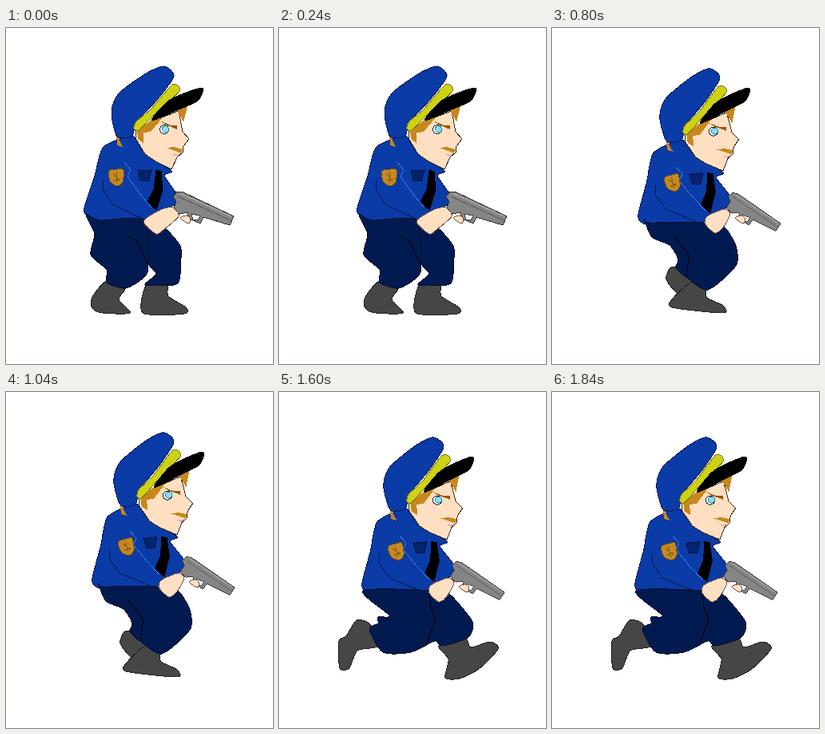
An HTML page that plays this animation: 334 px wide and 421 px high, repeating every 2000 ms.

```html
<!DOCTYPE html>
<html lang="en">
<head>
<meta charset="utf-8">
<title>Crouching officer</title>
<style>
html, body { margin: 0; width: 100%; height: 100%; overflow: hidden; background: #fff; }
svg { display: block; width: 100vw; height: 100vh; }
path, circle { shape-rendering: crispEdges; }
</style>
</head>
<body>
<svg id="stage" viewBox="0 0 334 421"></svg>
<script>
const BLUE = '#0a3ba6', EDGE = '#041a55', NAVY = '#031a51', BOOT = '#464646',
  SKIN = '#ffdfc2', HAIR = '#c8871c', GOLD = '#c68a22', STEEL = '#858585';

const poly = (fill, stroke, points) => `<path d="M${points}Z" fill="${fill}" stroke="${stroke}"/>`;
const line = (stroke, points) => `<path d="M${points}" fill="none" stroke="${stroke}"/>`;
const disc = (fill, stroke, x, y, r) => `<circle cx="${x}" cy="${y}" r="${r}" fill="${fill}" stroke="${stroke}"/>`;
const group = (transform, body) => `<g transform="${transform}">${body}</g>`;

// Closed soft outline through a few points
function blob(fill, stroke, points) {
  const v = points.split(' ').map(Number), n = v.length;
  const at = i => v[(i + n) % n];
  let d = `${v[0]} ${v[1]}`;
  for (let i = 0; i < n; i += 2) {
    const ease = (k, s) => at(k) + s * (at(k + 2) - at(k - 2)) / 8;
    d += `C${ease(i, 1)} ${ease(i + 1, 1)} ${ease(i + 2, -1)} ${ease(i + 3, -1)} ${at(i + 2)} ${at(i + 3)}`;
  }
  return poly(fill, stroke, d);
}
const cloth = points => blob(NAVY, '#020c2c', points);
const boot = points => blob(BOOT, '#222', points);

const cap =
  blob(BLUE, EDGE, '139 136 132 105 141 82 175 57 198 48 210 61 189 90 163 118 158 135') +
  blob('#ced114', '#77790d', '160 126 163 117 181 102 208 71 217 79 188 106 166 128') +
  blob('#000', '#000', '182 116 205 90 245 75 240 91 214 103');

const face =
  poly(HAIR, 'none', '138 133 146 149 139 147') +
  poly(SKIN, '#3a2a20', '163 127 182 117 216 104 221 130 229 139 222 148 221 156 214 162 207 177 187 167 174 158 162 138') +
  poly(HAIR, 'none', '164 127 186 113 196 112 181 130 172 131 172 144 165 139') +
  poly(HAIR, 'none', '214 103 227 98 222 118') +
  disc('#fff', '#222', 198, 127, 5.5) +
  disc('#8edcf0', '#2586a0', 199.5, 126.5, 4) +
  poly('#93560b', 'none', '193 116 206 122 214 122 214 127 200 121') +
  poly(HAIR, 'none', '201 150 210 149 221 152 219 157') +
  line('#e08a80', '209 158 213 160 217 158');

const torso =
  blob(BLUE, EDGE, '121 150 148 137 160 136 174 157 207 179 198 185 214 209 211 221 174 241 117 241 101 235 98 225 111 185') +
  poly('#000', '#000', '188 178 194 180 196 203 188 228 177 218 185 202') +
  poly('#04246f', '#021440', '165 179 182 178 178 192 168 191') +
  line(EDGE, '122 190 121 202 133 221 173 240') +
  line('#3976df', '148 168 156 178 152 186 166 206 182 225');

const badge =
  blob(GOLD, '#7a5210', '-9 -8 1 -10 9 -9 8 6 1 11 -8 5') +
  line('#855a13', '-4 -5 4 5M-4 4 5 2M0 -7 0 7');

const gun =
  poly(STEEL, '#333', '209 211 214 205 222 206 285 236 280 247 247 237 243 245 229 239 227 231 217 233 209 227 213 218') +
  poly('#fff', '#444', '232 233 243 235 240 241 234 240') +
  line('#5b5b5b', '215 211 281 241') +
  line('#b1b1b1', '217 207 282 236');

const hand = points => blob(SKIN, '#6d5544', points);
const fingers = hand('218 238 226 235 231 240 228 245');

const legs = {
  stand: () =>
    boot('126 317 108 337 108 351 121 357 155 357 141 340 149 326') +
    boot('176 321 171 357 223 358 225 350 203 336 201 320') +
    cloth('172 241 189 257 200 252 218 273 219 289 217 315 210 322 174 322 188 308 178 296 160 260') +
    cloth('100 234 118 241 172 241 178 297 173 312 150 326 126 319 126 303 106 284 111 258') +
    line('#000', '152 260 163 267 178 297'),

  stride: () =>
    boot('114 293 130 294 147 318 125 330 113 350 106 350 106 319') +
    boot('210 320 226 320 232 328 262 321 262 333 220 364 207 364 212 338') +
    cloth('107 238 171 238 190 254 212 240 235 275 229 290 237 295 226 310 228 320 209 331 180 308 163 326 147 320 139 298 144 272 121 267') +
    line('#000', '142 270 154 284 170 291 182 309'),

  pass: () =>
    boot('151 299 175 317 160 334 143 315') +
    boot('175 318 192 327 194 338 214 348 214 357 150 350 152 338') +
    cloth('116 240 122 244 188 244 205 257 216 250 230 273 230 298 195 328 169 313 155 300 158 290 147 272 125 262') +
    line('#000', '152 260 172 285 168 311'),

  squat: () =>
    boot('132 303 152 314 141 338 150 354 149 360 124 360 99 330 102 317') +
    boot('204 296 220 300 225 313 242 328 240 333 207 332 190 321') +
    cloth('207 265 215 255 237 261 243 278 241 293 222 300 204 296') +
    cloth('112 249 123 255 183 255 206 270 202 305 175 319 152 320 130 300 137 282 121 265'),

  lunge: () =>
    boot('97 286 114 291 124 318 98 324 88 346 76 346 75 312 84 306') +
    boot('200 318 233 309 240 320 264 313 274 322 250 347 226 359 208 358 212 335') +
    cloth('105 249 185 249 205 262 214 254 242 288 236 308 204 318 195 312 165 326 130 326 113 297 124 290 124 282 138 280') +
    line('#000', '188 250 190 270 196 285 185 315')
};

function upright(dy, lower) {
  const grip = hand('172 242 195 227 209 225 216 236 198 252 188 258');
  return group(`translate(0 ${dy})`, torso + group('translate(138 187)', badge) + face + cap) +
    lower() +
    group(`translate(0 ${dy})`, gun + grip + fingers);
}

function leaning(dx, dy, lower) {
  const grip = hand('192 246 194 236 215 227 223 233 214 250 204 257');
  const aim = 'translate(226 206) rotate(9.4) scale(.926) translate(-214 -205)';
  const shift = `translate(${dx} ${dy})`;
  return group(shift, group('rotate(-3.4 245 62)', torso + face + cap) +
      group('translate(151 194) rotate(-12)', badge)) +
    lower() +
    group(shift, group(aim, gun) + grip + group('translate(11 0)', fingers));
}

const HOLD = 400;
const stage = document.getElementById('stage');
const poses = [
  upright(0, legs.stand),
  upright(-2, legs.stride),
  leaning(0, 0, legs.pass),
  leaning(-7, 12, legs.squat),
  leaning(-4, 6, legs.lunge)
];
stage.innerHTML = poses.map(p => group('', p)).join('');
const layers = [...stage.children];

function draw(ms) {
  const current = Math.floor(ms / HOLD) % layers.length;
  layers.forEach((g, i) => g.setAttribute('display', i === current ? 'inline' : 'none'));
}

const start = performance.now();
function tick() {
  draw(performance.now() - start);
  requestAnimationFrame(tick);
}
tick();
</script>
</body>
</html>
```
